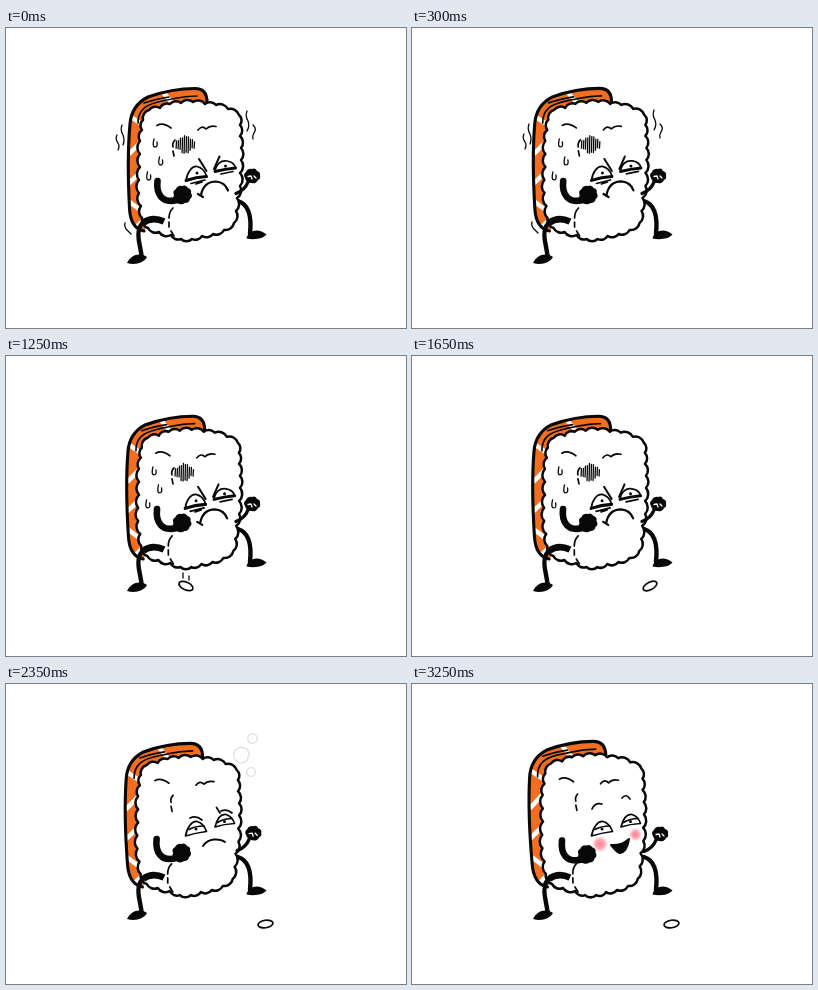
These frames come from a looping animation (400x300 px, 5.25 s). An HTML page:

```html
<!DOCTYPE html>
<html lang="en">
<head>
<meta charset="utf-8">
<title>Nervous nigiri</title>
<style>
html, body { margin: 0; width: 100%; height: 100%; overflow: hidden; background: #fff; }
svg { display: block; width: 100vw; height: 100vh; }
.line { fill: none; stroke: #080808; stroke-width: 1.7; stroke-linecap: round; stroke-linejoin: round; }
.thin { stroke-width: 1.3; }
.bold { stroke-width: 2.5; }
.limb { stroke-width: 4.4; }
.thick { stroke-width: 6.6; }
.ink { fill: #080808; stroke: none; }
.white { fill: #fff; }
.stripe { fill: none; stroke: #fff; stroke-width: 4.5; }
.bubble { fill: #fff; stroke: #dedede; stroke-width: 1.3; }
</style>
</head>
<body>
<svg viewBox="0 0 400 300">
  <defs>
    <radialGradient id="pink">
      <stop offset="0" stop-color="#ff7f92"/>
      <stop offset=".55" stop-color="#ff9aa9" stop-opacity=".85"/>
      <stop offset="1" stop-color="#ffc4cc" stop-opacity="0"/>
    </radialGradient>
    <path id="fish" d="M138 203C128 201 124 193 123.500 180C122 152 122 118 124 96C125 84 130 75 142 69C156 64 174 60.500 189 60.500C197 60.500 201 65 201 74"/>
  </defs>

  <g id="slice">
    <use href="#fish" fill="#f36f1f"/>
    <path fill="#f36f1f" d="M138 203L201 74L150 90Z"/>
    <path class="stripe" d="M122 87L137 97M123 126L137 112M122 156L137 142M121 172L137 184M128 201L140 190M157 64L166 75"/>
    <path class="line" d="M132 95C132 82 140 77 152 74C165 71 178 68 191 68M138 75C147 72 155 70 163 69"/>
    <use href="#fish" class="line" style="stroke-width:3.1"/>
  </g>

  <path class="line limb" d="M232 173C242 176 246 187 244 206"/>
  <path class="ink" d="M240.500 210.500C242 203 252 199 260.500 206.500C257 211 248 212 240.500 210.500Z"/>

  <g id="rice">
    <path id="block" class="line bold white"/>
    <path class="line" d="M151 97.500Q157 94 165 100M192 102Q196 97 200 101Q204 97 210 98.500"/>
    <path class="line" d="M169 112Q166 115 167 119M167 123L168 128M167 180Q163 184 163 190M163 194V199M165 203L168 208"/>
    <g id="worry">
      <path id="hatch" class="line thin"/>
      <path id="sweat" class="line thin"/>
      <path class="line" d="M180 153C181 144 186 138 191 138.500C197 140 199 143 200.500 148"/>
      <path class="line" style="stroke-width:3" d="M180 152.500Q190 149 200.500 148.500"/>
      <path class="line" d="M185 155.500L199 152M190 156L196 154"/>
      <path class="line" d="M209 143.500C210 136 215 132 221 133C227 134 229 137 229.500 140"/>
      <path class="line" style="stroke-width:3" d="M209 143.500Q219 141 229.500 140"/>
      <path class="line" d="M215 146L227 143.500"/>
      <path class="line" style="stroke-width:2" d="M193 131L200.500 143M213.500 128.500L208 141"/>
      <circle class="ink" cx="191" cy="145" r="1.5"/>
      <circle class="ink" cx="219.500" cy="138" r="1.5"/>
      <path class="line" style="stroke-width:2.2" d="M195 167C197 157 203 153.500 210 153.500C216 154 220 157 222 162.500M192 166L197 169"/>
    </g>
  </g>

  <g id="calm">
    <circle class="blush" cx="188" cy="160" r="8.500" fill="url(#pink)"/>
    <circle class="blush" cx="223.500" cy="150.500" r="7" fill="url(#pink)"/>
    <path class="line white" d="M179.500 152C181 143 186 137 191 137.500C197 139 199 143 200.500 147.500Q189 149 179.500 152Z"/>
    <path class="line white" d="M209 143C211 135 215 130 220 130.500C225 132 227 135 228.500 139.500Q218 140 209 143Z"/>
    <path class="line" d="M183 145.500Q189 142 198 142M211.500 138.500Q218 134.500 226 134.500"/>
    <circle class="ink" cx="190" cy="145" r="1.5"/>
    <circle class="ink" cx="218.500" cy="137.500" r="1.5"/>
    <path id="brows" class="line"/>
    <path id="mouth" class="line" style="stroke-width:2"/>
  </g>

  <g id="armR">
    <path class="line" style="stroke-width:3.4" d="M230 165.500Q239 162 242 154"/>
    <path id="fistR" class="ink"/>
    <path class="line thin" style="stroke:#fff" d="M242 148.500L245 148L246 151M248 148L250 150"/>
  </g>
  <g id="armL">
    <path class="line thick" d="M151.500 153C150 166 156 176 171 172"/>
    <path id="fistL" class="ink"/>
  </g>
  <path class="line thick" style="stroke-linecap:butt" d="M158 193.500Q146 188 137 195"/>
  <path class="line limb" d="M141 192C130 197 132 209 133.500 216Q135 224 136 230"/>
  <path class="ink" d="M121 235C125 227 133 224 141 229C137 236 128 237 121 235Z"/>

  <path id="shake" class="line thin" d="M111 107Q109 111 112 115Q114 118 112 122M116 97Q114 102 117 107Q119 112 117 117M241 83Q239 88 242 93Q244 98 241 103M247 97Q251 101 248 105Q246 108 247 111M119 195Q118 199 121 202L125 206"/>

  <g id="bubbles">
    <circle class="bubble" cx="246.500" cy="54.500" r="4.800"/>
    <path id="puff" class="bubble"/>
    <circle class="bubble" cx="245" cy="88" r="4.300"/>
  </g>
  <path id="drop" class="line thin" d="M177 217V222M183 220V224"/>
  <ellipse id="grain" class="line white" rx="7.500" ry="3.800"/>
</svg>

<script>
const LOOP = 5250;
const $ = id => document.getElementById(id);

// Closed outline of outward bumps through a clockwise list of points
function bumps(list, round = 0.72) {
  const pts = list.split(' ').map(p => p.split(',').map(Number));
  let d = `M${pts[0]}`;
  pts.forEach((p, i) => {
    const q = pts[(i + 1) % pts.length];
    const r = Math.hypot(q[0] - p[0], q[1] - p[1]) * round;
    d += `A${r} ${r} 0 0 1 ${q}`;
  });
  return d + 'Z';
}

$('block').setAttribute('d', bumps(
  '137,92 143,82 154,80 164,76 175,75 187,74 199,76 210,77 222,81 233,87 ' +
  '234,97 234,108 235,120 235,132 234,145 234,158 231,170 230,183 228,195 ' +
  '218,202 207,206 196,208 186,211 175,211 165,207 153,204 142,200 ' +
  '136,190 135,178 133,165 133,152 134,139 134,126 134,113 136,102'));
$('fistL').setAttribute('d', bumps('168,167 170,161 176,158 182,160 185,165 184,171 179,175 170,174'));
$('fistR').setAttribute('d', bumps('239,150 240,144 246,141 251,143 254,148 252,152 246,155'));
$('puff').setAttribute('d', bumps('228,70 231,65 237,64 242,67 242,73 238,78 231,77', 0.75));

let hatch = '';
for (let i = 0; i < 10; i++) {
  const x = 170.5 + i * 2, edge = Math.abs(i - 4.5);
  hatch += `M${x} ${107 + edge * 1.3 + i % 2}L${x - 0.4} ${127 - edge * 1.5 - i % 3}`;
}
$('hatch').setAttribute('d', hatch);
$('sweat').setAttribute('d', [[149, 111], [154.5, 129], [142.5, 144]]
  .map(([x, y]) => `M${x - 1} ${y}Q${x - 3} ${y + 8} ${x} ${y + 8}Q${x + 3} ${y + 8} ${x + 2} ${y + 3}`).join(''));

const FROWN = 'M197 162Q201 156 208 155.500Q215 155 219 158';
const FLAT = 'M197 160Q206 159 217 156';
const GRIN = 'M199 161Q209 162 217 155';
const OPEN = GRIN + 'C216 162 213 168 208 169C204 168 202 164 199 161Z';
const CROSS = 'M184 134Q190 131 196 136M210.5 123.5L214 129M215 127Q221 124.5 226 129';
const EASED = 'M179 130Q184 125 191 127M209 119Q214 117 220 121';
const RAISED = 'M180 125Q183 118 190 120M210 114Q214 109 218 115';

// Each step holds until the next; lean settles the body back and left
const steps = [
  { at: 0, lean: 0, shake: 0 },
  { at: 100, lean: 1, shake: 1 },
  { at: 200, lean: 0, shake: 0 },
  { at: 300, lean: 1, shake: 1 },
  { at: 400, lean: 0, shake: 0 },
  { at: 500, lean: 1 },
  { at: 1250, lean: 1.6, grain: [180, 230, 25], drop: 1 },
  { at: 1450, lean: 1.6, grain: [193, 239, 8] },
  { at: 1550, lean: 1.6, grain: [216, 229, -20] },
  { at: 1650, lean: 1.6, grain: [238, 230, -28] },
  { at: 1750, lean: 1.6, grain: [251, 236, -16] },
  { at: 1850, lean: 1.6, grain: [259.5, 240, -8] },
  { at: 2350, lean: 3, mouth: FROWN, brows: CROSS, rise: 0 },
  { at: 2450, lean: 3.6, mouth: FROWN, brows: CROSS, rise: 6 },
  { at: 2650, lean: 4.5, mouth: FLAT, brows: EASED, rise: 10, blush: 0.25 },
  { at: 2850, lean: 5, mouth: GRIN, brows: RAISED, rise: 13, blush: 0.6 },
  { at: 3050, lean: 5, mouth: OPEN, brows: RAISED, rise: 14.5, blush: 1 },
  { at: 3250, lean: 5, mouth: OPEN, brows: RAISED, blush: 1 }
];

const show = (id, on) => { $(id).style.display = on ? '' : 'none'; };
const move = (id, t) => $(id).setAttribute('transform', t);

// Shift, skew and stretch a part, measured at y 65 with y 205 as the base
function lean(id, k, shift, skew, lift) {
  const s = k * skew / 140, v = k * k * lift / 140;
  move(id, `matrix(1 0 ${s} ${1 + v} ${-k * shift - 205 * s} ${-205 * v})`);
}

function draw(s) {
  const k = s.lean / 5, calm = s.mouth !== undefined;
  lean('slice', k, 2.5, 5, 3);
  lean('rice', k, 2, 2, 3);
  move('armL', `translate(${-1.5 * k} ${calm ? 3.5 * k : 0})`);
  move('armR', `translate(${calm ? 2 * k : 0} ${calm ? 2 * k : 0})`);

  show('worry', !calm);
  show('calm', calm);
  if (calm) {
    $('mouth').setAttribute('d', s.mouth);
    $('mouth').style.fill = s.mouth === OPEN ? '#080808' : 'none';
    $('brows').setAttribute('d', s.brows);
    document.querySelectorAll('.blush').forEach(b => b.setAttribute('opacity', s.blush || 0));
  }

  show('shake', s.shake !== undefined);
  move('shake', `translate(${s.shake || 0} ${-(s.shake || 0)})`);
  show('bubbles', s.rise !== undefined);
  move('bubbles', `translate(0 ${-(s.rise || 0)})`);

  const g = s.grain || (calm ? [259.5, 240, -8] : null);
  show('drop', s.drop);
  show('grain', g);
  if (g) move('grain', `translate(${g[0]} ${g[1]}) rotate(${g[2]})`);
}

let last;
const start = performance.now();
function tick(now) {
  const t = Math.max(0, now - start) % LOOP;
  const step = steps.findLast(s => s.at <= t);
  if (step !== last) draw(last = step);
  requestAnimationFrame(tick);
}
tick(start);
</script>
</body>
</html>
```
